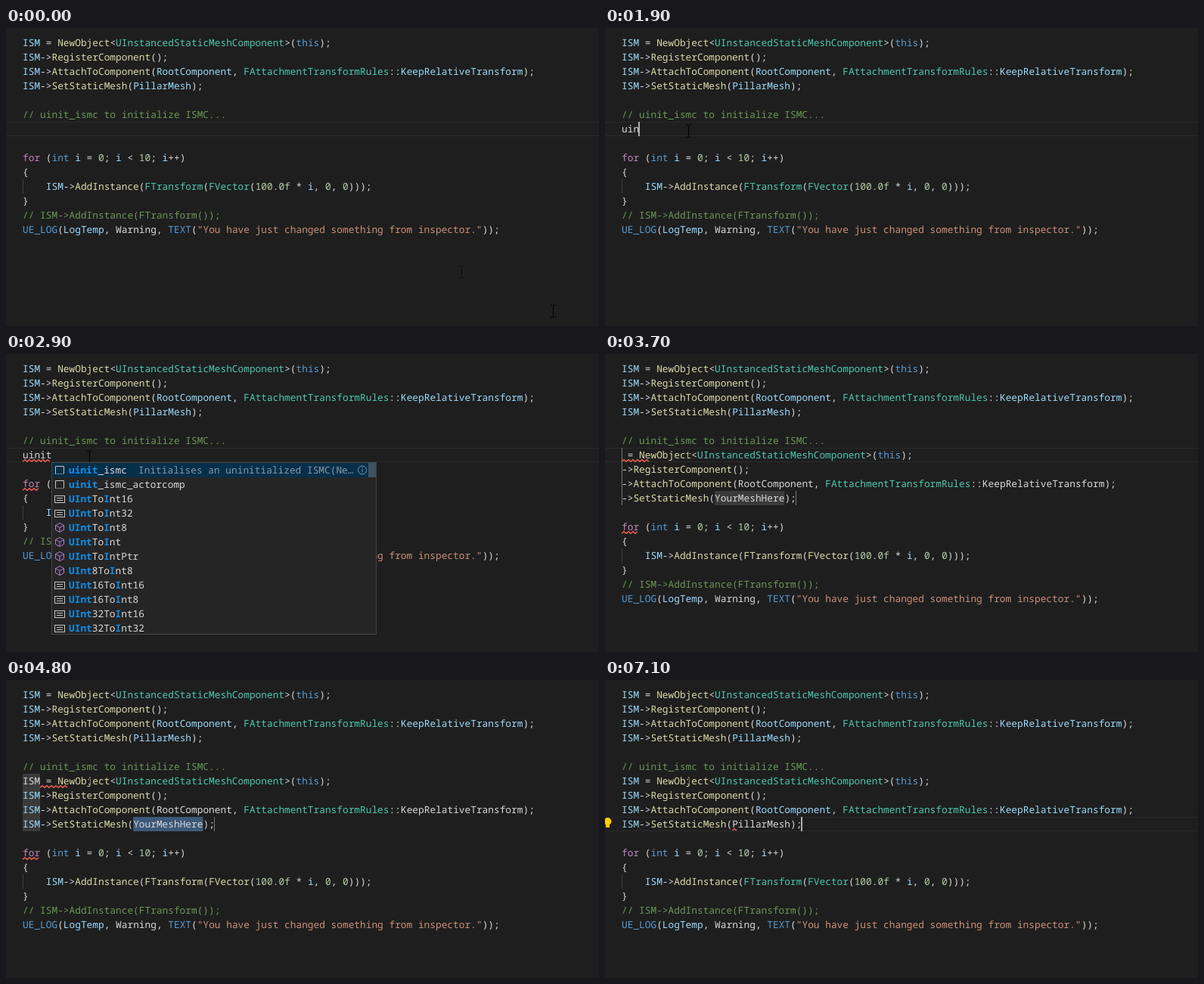
Recreate the animation shown at these times as an HTML page with a canvas. Size 784 by 394 pixels, loop 7200 ms.

```html
<!DOCTYPE html>
<html lang="en">
<head>
<meta charset="utf-8">
<title>Code snippet demo</title>
<style>
  html, body { margin: 0; width: 100%; height: 100%; overflow: hidden; background: #1e1e1e; }
  canvas { display: block; }
</style>
</head>
<body>
<canvas id="stage" width="784" height="394"></canvas>
<script>
const ctx = document.getElementById('stage').getContext('2d');
const LOOP = 7200, LEFT = 22, TOP = 10, ROW = 19, CHAR = 7.692;
const FONT = '12.82px "Noto Sans Mono", "DejaVu Sans Mono", monospace';
const TEXT = '#dadada', BLUE = '#569cd6', VAR = '#9cdcfe', TYPE = '#4ec9b0', FUNC = '#dcdcaa';

// Event times in ms
const POPUP = 2300, ERRORS = 2600, INSERT = 3000, TAB = 4300, SEMANTIC = 5500, DONE = 6100, BULB = 6200;
const trigger = [[0, ''], [1700, 'u'], [1800, 'ui'], [1900, 'uin'], [2000, 'uini'], [2100, 'uinit']];
const name = [[0, ''], [3900, 'I'], [4000, 'IS'], [4100, 'ISM']];
const arg = [[0, 'YourMeshHere'], [5000, 'P'], [5100, 'Pi'], [5300, 'Pil'], [5400, 'Pill'],
  [5600, 'Pilla'], [5700, 'Pillar'], [6000, 'PillarMesh']];
const mouse = [[0, [723, 374]], [100, [602, 322]], [200, [110, 136]]];
const keyTimes = [-600, INSERT, TAB, DONE,
  ...[trigger, name, arg].flatMap(steps => steps.slice(1).map(s => s[0]))];

const at = (steps, t) => steps.filter(s => s[0] <= t).pop()[1];
const colX = col => LEFT + col * CHAR;
const rowY = row => TOP + row * ROW;

const words = {};
const setColor = (color, list) => list.split(' ').forEach(w => words[w] = color);
setColor(VAR, 'ISM RootComponent KeepRelativeTransform PillarMesh LogTemp i');
setColor(TYPE, 'UInstancedStaticMeshComponent FAttachmentTransformRules FTransform FVector');
setColor(BLUE, 'this int UE_LOG TEXT');
setColor('#c586c0', 'for');

const block = (id, mesh) => [
  id + ' = NewObject<UInstancedStaticMeshComponent>(this);',
  id + '->RegisterComponent();',
  id + '->AttachToComponent(RootComponent, FAttachmentTransformRules::KeepRelativeTransform);',
  id + `->SetStaticMesh(${mesh});`
];
const loopCode = [
  '',
  'for (int i = 0; i < 10; i++)',
  '{',
  '    ISM->AddInstance(FTransform(FVector(100.0f * i, 0, 0)));',
  '}',
  '// ISM->AddInstance(FTransform());',
  'UE_LOG(LogTemp, Warning, TEXT("You have just changed something from inspector."));'
];
const items = ['uinit_ismc', 'uinit_ismc_actorcomp', 'UIntToInt16', 'UIntToInt32', 'UIntToInt8', 'UIntToInt',
  'UIntToIntPtr', 'UInt8ToInt8', 'UInt16ToInt16', 'UInt16ToInt8', 'UInt32ToInt16', 'UInt32ToInt32'];

function rect(x, y, w, h, color) {
  ctx.fillStyle = color;
  ctx.fillRect(x, y, w, h);
}

function frame(x, y, w, h, color) {
  ctx.strokeStyle = color;
  ctx.lineWidth = 1;
  ctx.strokeRect(x + .5, y + .5, w - 1, h - 1);
}

function path(points, color, width = 1) {
  ctx.strokeStyle = color;
  ctx.lineWidth = width;
  ctx.beginPath();
  points.forEach(([x, y]) => ctx.lineTo(x, y));
  ctx.stroke();
}

function write(str, x, y, color, bold) {
  ctx.font = (bold ? 'bold ' : '500 ') + FONT;
  ctx.fillStyle = color;
  ctx.fillText(str, x, y + 14);
}

// plain: words not yet resolved, coloured by syntax only
function codeLine(str, row, plain = []) {
  for (const m of str.matchAll(/\/\/.*|".*"|[A-Za-z_]\w*|\d[\w.]*|[^\w"\/]+/g)) {
    const w = m[0], next = str[m.index + w.length];
    let color = TEXT;
    if (w.startsWith('//')) color = '#6a9955';
    else if (w[0] === '"') color = '#ce9178';
    else if (/^\d/.test(w)) color = '#b5cea8';
    else if (words[w] && !plain.includes(w)) color = words[w];
    else if (/^\w/.test(w) && (next === '(' || next === '<')) color = FUNC;
    write(w, colX(m.index), rowY(row), color);
  }
}

function squiggle(col, length, row) {
  const points = [], y = rowY(row) + 17;
  for (let x = 0; x <= length * CHAR; x += 3) points.push([colX(col) + x, y + (x % 6 ? -1.3 : 1.3)]);
  path(points, '#f4604f', 1.3);
}

function lineHighlight(row) {
  rect(0, rowY(row), 784, 1, '#2a2a2a');
  rect(0, rowY(row) + 18, 784, 1, '#2a2a2a');
}

function caret(col, row) {
  rect(Math.round(colX(col)) - 1, rowY(row), 2, ROW, '#aeafad');
}

function beam([x, y], color) {
  rect(x, y - 7, 1, 15, color);
  for (const end of [y - 8, y + 8]) {
    rect(x - 3, end, 3, 1, color);
    rect(x + 1, end, 3, 1, color);
  }
}

function icon(i, y) {
  if (i < 2) {
    path([[65.5, y + 14], [65.5, y + 4.5], [76.5, y + 4.5], [76.5, y + 14]], '#c5c5c5');
    for (let x = 65; x < 77; x += 2) rect(x, y + 14, 1, 1, '#c5c5c5');
  } else if (i > 3 && i < 8) {
    const p = '#b180d7', c = [71, y + 9.5];
    path([[71, y + 3.5], [76.5, y + 6.5], [76.5, y + 12.5], [71, y + 15.5],
      [65.5, y + 12.5], [65.5, y + 6.5], [71, y + 3.5]], p);
    path([[65.5, y + 6.5], c, [76.5, y + 6.5]], p);
    path([c, [71, y + 15.5]], p);
  } else {
    frame(64, y + 5, 14, 10, '#c5c5c5');
    rect(67, y + 8, 8, 1, '#c5c5c5');
    rect(67, y + 11, 8, 1, '#c5c5c5');
  }
}

function popup() {
  rect(60, 143, 430, 228, '#252526');
  rect(61, 144, 428, ROW, '#062f4a');
  frame(60, 143, 430, 228, '#454545');
  items.forEach((item, i) => {
    const y = 144 + i * ROW;
    icon(i, y);
    // odd parts are the matched letters
    const parts = item.split(i < 2 ? /(uinit)/ : /(^UInt|I(?=nt))/);
    let x = 83;
    parts.forEach((part, k) => {
      write(part, x, y, k % 2 ? '#0f8fe8' : TEXT, k % 2);
      x += part.length * CHAR;
    });
  });
  write('Initialises an uninitialized ISMC(Ne…', 175, 144, '#8699a6');
  ctx.strokeStyle = '#7f9bb0';
  ctx.beginPath();
  ctx.arc(471, 153.5, 5.5, 0, 7);
  ctx.stroke();
  rect(470.5, 152.5, 1, 4, '#7f9bb0');
  rect(470.5, 150, 1, 1, '#7f9bb0');
  rect(479, 144, 10, ROW, 'rgba(121,121,121,.5)');
}

function placeholders(t, id, mesh) {
  const n = id.length, start = n + 16;
  for (let row = 6; row < 10; row++)
    rect(LEFT, rowY(row), Math.max(1, n * CHAR), ROW, n ? '#3a3a3a' : '#777');
  const selected = t >= TAB && t < 5000;
  rect(colX(start), rowY(9), mesh.length * CHAR, ROW, selected ? '#3c5878' : '#3a3a3a');
  rect(Math.floor(colX(start + mesh.length + 2)), rowY(9), 1, ROW, '#777');
  if (t >= 5000)
    for (const col of [start - 1, start + mesh.length])
      frame(Math.round(colX(col)), rowY(9), 8, ROW, '#888');
}

function draw(t) {
  const inserted = t >= INSERT, typed = at(trigger, t), id = at(name, t), mesh = at(arg, t);
  const lastKey = Math.max(...keyTimes.filter(k => k <= t));
  const caretOn = Math.floor((t - lastKey) / 500) % 2 === 0;
  const shift = inserted ? 3 : 0;
  const unresolved = inserted && t < SEMANTIC
    ? ['RootComponent', 'KeepRelativeTransform', 'FTransform', 'FVector'] : [];

  rect(0, 0, 784, 394, '#1e1e1e');
  if (t < TAB) lineHighlight(6);
  else if (t >= 5000) lineHighlight(9);
  if (inserted && t < DONE) placeholders(t, id, mesh);
  rect(LEFT, rowY(10 + shift), 1, ROW, '#404040');

  block('ISM', 'PillarMesh').forEach((line, i) => codeLine(line, i));
  codeLine('// uinit_ismc to initialize ISMC...', 5);
  if (inserted) {
    block(id, mesh).forEach((line, i) =>
      codeLine(line, 6 + i, i === 0 && t < SEMANTIC ? ['ISM'] : i === 3 ? ['PillarMesh'] : unresolved));
  } else codeLine(typed, 6);
  loopCode.forEach((line, i) => codeLine(line, 7 + shift + i, unresolved));

  if (t >= ERRORS && t < SEMANTIC) {
    squiggle(id.length, 5, 6);
    squiggle(0, 3, 8 + shift);
  } else if (t >= SEMANTIC) squiggle(19, 1, 9);

  if (caretOn) {
    if (!inserted) caret(typed.length, 6);
    else if (t < TAB) for (let row = 6; row < 10; row++) caret(id.length, row);
    else caret(19 + mesh.length + (t >= DONE ? 2 : 0), 9);
  }

  if (t < 100) beam([602, 322], '#101010');
  if (!inserted) beam(at(mouse, t), '#000');
  else {
    rect(110, 130, 1, 7, '#1e1e1e');
    rect(109, 137, 1, 1, TEXT);
  }
  if (t >= POPUP && !inserted) popup();

  if (t >= BULB) {
    ctx.fillStyle = '#fc0';
    ctx.beginPath();
    ctx.arc(3.5, 187, 5, 0, 7);
    ctx.fill();
    rect(1, 191, 5, 4, '#fc0');
  }
}

ctx.textRendering = 'geometricPrecision';
const begin = performance.now();
function tick() {
  draw((performance.now() - begin) % LOOP);
  requestAnimationFrame(tick);
}
tick();
</script>
</body>
</html>
```
